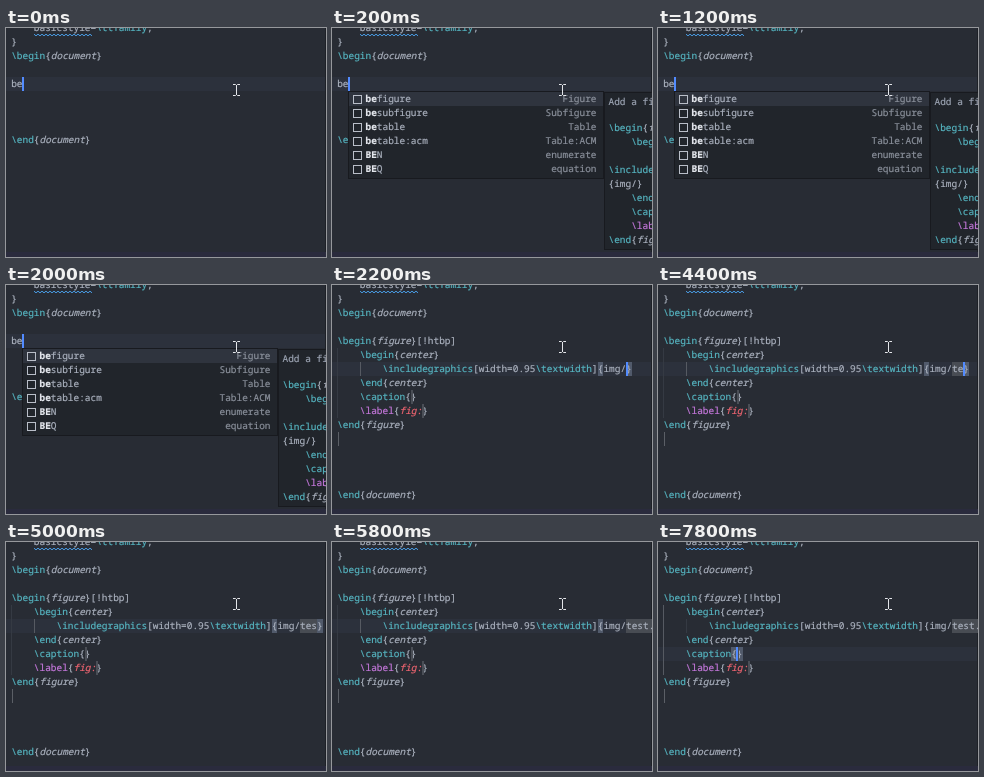
An HTML page that plays this animation: 320x229 px, repeating every 8 s.

```html
<!DOCTYPE html>
<html lang="en">
<head>
<meta charset="utf-8">
<title>LaTeX snippet completion</title>
<style>
  html, body { margin: 0; width: 100%; height: 100%; overflow: hidden; background: #282c34; }
  #stage {
    position: relative; width: 320px; height: 229px; overflow: hidden;
    background: #282c34; color: #abb2bf;
    font: 9.45px/14px "Noto Sans Mono", "DejaVu Sans Mono", monospace;
    text-rendering: geometricPrecision; font-variant-ligatures: none;
    -webkit-text-stroke: .18px;
  }
  #stage > *, .figure > * { position: absolute; }
  pre { margin: 0; left: 5.2px; font: inherit; }
  i { font-style: italic; }
  u { color: #56b6c2; text-decoration: none; }
  .ref { color: #c678dd; }
  .ref i { color: #ee6470; }

  /* every timed part shares one 8 s clock with hard steps */
  .timed, .caret::after { animation: 8s step-end infinite; }
  .start { animation-name: start; }
  .popup { animation-name: popup; }
  .figure { animation-name: figure; }
  @keyframes start { 0% { opacity: 1; } 27.5%, 100% { opacity: 0; } }
  @keyframes popup { 0% { opacity: 0; } 2.5% { opacity: 1; } 27.5%, 100% { opacity: 0; } }
  @keyframes figure { 0% { opacity: 0; } 27.5%, 100% { opacity: 1; } }

  .line { left: 0; top: 49px; width: 319px; height: 14px; background: #2c313c; animation-name: line; }
  @keyframes line {
    0% { transform: none; }
    27.5% { transform: translateY(28px); }
    97.5%, 100% { transform: translateY(56px); }
  }

  .caret, .stop { display: inline-block; position: relative; width: 0; height: 14px; vertical-align: top; }
  .caret { z-index: 1; }
  .caret::after {
    content: ""; position: absolute; left: -.5px; top: 0; width: 2px; height: 14px;
    background: #528bff; animation-name: blink;
  }
  .caret.last::after { animation-name: caption; }
  @keyframes blink {
    0%, 12.5%, 25%, 40%, 47.5%, 67.5% { opacity: 1; }
    7.5%, 20%, 32.5%, 45%, 62.5%, 97.5%, 100% { opacity: 0; }
  }
  @keyframes caption { 0% { opacity: 0; } 97.5%, 100% { opacity: 1; } }

  .stop::after {
    content: ""; position: absolute; left: 0; top: 0; width: 2px; height: 14px; background: #4a4e56;
  }
  .stop.end::after { left: .8px; width: 1px; background: #5b5f66; }

  .typed {
    display: inline-block; overflow: hidden; vertical-align: top; height: 14px;
    background: #484c53; animation-name: type;
  }
  @keyframes type {
    0% { width: 0; }
    47.5% { width: 1ch; }
    55% { width: 2ch; }
    57.5% { width: 3ch; }
    67.5% { width: 4ch; }
    72.5%, 100% { width: 5ch; }
  }

  .brace { display: inline-block; vertical-align: top; height: 14px; animation-name: pathBrace; }
  .brace.cap { animation-name: capBrace; }
  @keyframes pathBrace { 0% { background: #515a6b; } 97.5%, 100% { background: transparent; } }
  @keyframes capBrace { 0% { background: transparent; } 97.5%, 100% { background: #515a6b; } }

  .guide { width: 1px; background: #353a43; }
  .outer { left: 5px; top: 63px; height: 70px; }
  .inner { left: 28px; top: 77px; height: 14px; }
  .guide b { position: absolute; inset: 0; background: #565a62; }
  .guide .before { animation-name: activeInner; }
  .guide .after { animation-name: caption; }
  @keyframes activeInner { 0% { opacity: 1; } 97.5%, 100% { opacity: 0; } }

  .edge { left: 319px; top: 0; width: 1px; height: 224px; background: #1d2026; }
  .bar { left: 0; top: 224px; width: 320px; height: 5px; background: #2a2b3d; }

  .list, .docs { box-sizing: border-box; background: #21252b; border: 1px solid #181a1f; }
  .list { left: 16px; top: 63px; width: 256px; height: 88px; }
  .row { position: relative; height: 14px; padding: 0 6.5px 0 16.5px; display: flex; justify-content: space-between; }
  .row:first-child { background: #2f343e; }
  .row::before {
    content: ""; position: absolute; left: 4px; top: 3px; width: 7px; height: 7px;
    border: 1px solid #b9bec8;
  }
  .row b { color: #e3e6ec; }
  .row em { font-style: normal; color: #8b919c; }
  .docs { left: 272px; top: 64px; width: 60px; height: 158px; padding: 2px 0 0 3.5px; white-space: pre; }
  .docs p { margin: 0 0 12px; color: #9da5b4; }
</style>
</head>
<body>
<div id="stage">
  <div class="line timed"></div>
  <div class="edge"></div>
  <div class="bar"></div>

  <pre style="top:-7px">    basicstyle=<u>\ttfamily</u>,
}
<u>\begin</u>{<i>document</i>}</pre>
  <svg style="left:28px;top:5px" width="58" height="4">
    <pattern id="wave" width="4" height="4" patternUnits="userSpaceOnUse">
      <path d="M-1 2Q0 .4 1 2T3 2T5 2" fill="none" stroke="#4a9fe8"/>
    </pattern>
    <rect width="58" height="4" fill="url(#wave)"/>
  </svg>

  <pre class="timed start" style="top:49px">be<span class="caret"></span>



<u>\end</u>{<i>document</i>}</pre>

  <div class="timed figure">
    <div class="guide outer"><b class="timed after"></b></div>
    <div class="guide inner"><b class="timed before"></b></div>
    <pre style="top:49px"><u>\begin</u>{<i>figure</i>}[!htbp]
    <u>\begin</u>{<i>center</i>}
        <u>\includegraphics</u>[width=0.95<u>\textwidth</u>]<span class="brace timed">{</span>img/<span class="typed timed">test.</span><span class="caret"></span><span class="brace timed">}</span>
    <u>\end</u>{<i>center</i>}
    <u>\caption</u><span class="brace cap timed">{</span><span class="stop"></span><span class="caret last"></span><span class="brace cap timed">}</span>
    <span class="ref">\label</span>{<span class="ref"><i>fig:</i></span><span class="stop"></span>}
<u>\end</u>{<i>figure</i>}
<span class="stop end"></span>



<u>\end</u>{<i>document</i>}</pre>
  </div>

  <div class="list timed popup">
    <div class="row"><span><b>be</b>figure</span><em>Figure</em></div>
    <div class="row"><span><b>be</b>subfigure</span><em>Subfigure</em></div>
    <div class="row"><span><b>be</b>table</span><em>Table</em></div>
    <div class="row"><span><b>be</b>table:acm</span><em>Table:ACM</em></div>
    <div class="row"><span><b>BE</b>N</span><em>enumerate</em></div>
    <div class="row"><span><b>BE</b>Q</span><em>equation</em></div>
  </div>
  <div class="docs timed popup"><p>Add a figure</p><u>\begin</u>{<i>figure</i>}
    <u>\begin</u>

<u>\include</u>
{img/}
    <u>\end</u>
    <u>\caption</u>
    <span class="ref">\label</span>
<u>\end</u>{<i>figure</i>}</div>

  <svg style="left:225px;top:55px" width="11" height="14">
    <path d="M2 1.5H4.5L5.5 2.5L6.5 1.5H9M5.5 2V12M2 12.5H4.5L5.5 11.5L6.5 12.5H9" fill="none" stroke="#e4e6ea"/>
  </svg>
</div>
</body>
</html>
```
